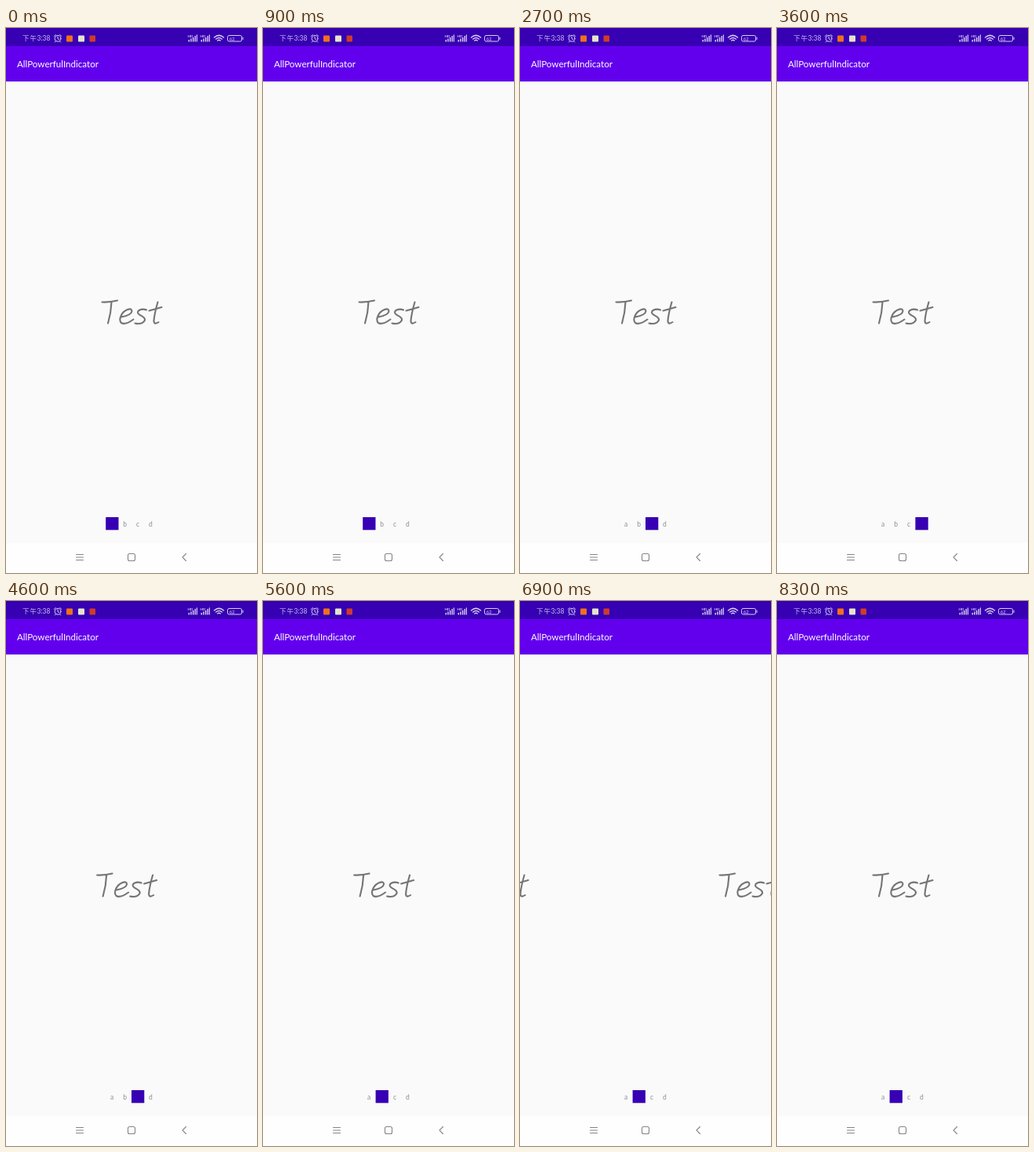
Animation of 320x693 px, one loop 8400 ms. Source, as an HTML page:

```html
<!DOCTYPE html>
<html lang="en">
<head>
<meta charset="utf-8">
<title>AllPowerfulIndicator</title>
<style>
  html, body { margin: 0; width: 100%; height: 100%; overflow: hidden; background: #fafafa; }
  svg { display: block; }
  text { font-family: Lato, "Noto Sans CJK SC", "Noto Sans CJK", sans-serif; }
  .line { fill: none; stroke-linecap: round; stroke-linejoin: round; }
</style>
</head>
<body>
<svg width="320" height="693" viewBox="0 0 320 693">
  <defs>
    <!-- handwritten word, no installed font has this shape -->
    <g id="word" class="line" stroke="#747474" stroke-width="2.1" role="img" aria-label="Test">
      <path d="M122.500 348.500Q132 349 142 346.500M134.500 348.500Q134 362 130 375.500"/>
      <path d="M147 367.500Q160 365 160.500 360Q160 356 155 358C147 361 143 371 147 375Q152 378 162.500 370.500"/>
      <path d="M179 358.500C173 356 166 359.500 168.500 363C171 366.500 178 367 177 371.500Q174 377.500 164.500 375.500"/>
      <path d="M182.500 359.500Q190 357.500 198.500 355M193.500 348.500Q189.500 362 188.500 372Q188.500 378 194.500 374"/>
    </g>
    <g id="signal" fill="#d7ccf0">
      <text x="-1" y="11.700" font-size="4.500" font-weight="bold">HD</text>
      <path d="M0 15h1.500v2.500h-1.500zM2.700 13.500h1.500v4h-1.500zM5.400 12h1.500v5.500h-1.500zM8 10h1.400v7.500h-1.400zM10.300 8.500h1.200v9h-1.200z"/>
    </g>
  </defs>

  <rect width="320" height="693" fill="#fafafa"/>
  <g id="pages"></g>
  <rect y="655" width="320" height="38" fill="#fefefe"/>

  <rect width="320" height="68" fill="#6200ee"/>
  <rect width="320" height="23" fill="#3700b3"/>
  <text x="14" y="49.500" font-size="11.600" fill="#fff">AllPowerfulIndicator</text>

  <g font-size="8.500" fill="#c9bbe8">
    <text x="21" y="16.300">下</text>
    <text x="30.500" y="16.300">午</text>
    <text x="39.500" y="16.300">3:38</text>
  </g>
  <g class="line" stroke="#d7ccf0">
    <circle cx="66" cy="13.300" r="3.900"/>
    <path d="M66 11v2.700l1.800 .8M61.300 10.500l2-2M70.700 10.500l-2-2M63.300 17l-1 1M68.700 17l1 1"/>
    <path d="M265.500 12Q271.500 6.800 277.500 12M267.700 14Q271.500 11 275.300 14M269.800 16Q271.500 14.700 273.200 16" stroke-width="1.500"/>
    <rect x="282.500" y="9.500" width="18" height="7.500" rx="2"/>
    <path d="M302 12v2.500"/>
  </g>
  <rect x="77" y="9.500" width="8" height="8" rx="1" fill="#f0701c"/>
  <rect x="92" y="9.500" width="8" height="8" rx="1" fill="#e6e2cc"/>
  <rect x="106.500" y="9.500" width="7.500" height="8" rx="1" fill="#cf3b2c"/>
  <use href="#signal" x="232.500"/>
  <use href="#signal" x="248.500"/>
  <text x="284.500" y="15.600" font-size="6.200" fill="#d7ccf0">62</text>

  <g id="tabs"></g>
  <rect id="mark" y="622" width="16.300" height="16.300" fill="#3700b3"/>

  <g class="line" stroke="#858585" stroke-width="1.100">
    <path d="M89.500 669.500h9M89.500 673h9M89.500 676.500h9M229.500 668.500l-4.500 4.500l4.500 4.500"/>
    <rect x="155.500" y="668.500" width="9" height="9" rx="2"/>
  </g>
</svg>
<script>
const LOOP = 8400, STEP = 100, WIDTH = 320, TAB = 16.4;
const $ = id => document.getElementById(id);

// Each swipe: start time, page left, page reached, share done at each step.
const settle = [.14, .54, .88, .98, 1];
const swipes = [
  [1300, 0, 1, [.02, .1, .34, .67, .93, 1]],
  [2300, 1, 2, settle],
  [3300, 2, 3, [.2, .58, .95, 1]],
  [4300, 3, 2, settle],
  [5300, 2, 1, settle],
  [6100, 1, 0, [.18, .67, .94, 1]],
  [6900, 0, 1, [.5875, .86, .955, .985, .997, 1]]
];

[..."abcd"].forEach((name, i) => {
  $("pages").innerHTML += `<use href="#word" x="${i * WIDTH}"/>`;
  $("tabs").innerHTML += `<text x="${135.2 + i * TAB}" y="634" font-size="8.5"
    text-anchor="middle" fill="#8e8e8e">${name}</text>`;
});

function draw(t) {
  let page = 0, selected = 0;
  for (const [start, from, to, shares] of swipes) {
    if (t < start) break;
    const step = Math.min(Math.floor((t - start) / STEP), shares.length - 1);
    const done = shares[step];
    page = from + (to - from) * done;
    selected = done > .5 ? to : from;
  }
  $("pages").setAttribute("transform", `translate(${-page * WIDTH} 0)`);
  $("mark").setAttribute("x", 127.2 + selected * TAB);
}

const begin = performance.now();
function tick() {
  draw((performance.now() - begin) % LOOP);
  requestAnimationFrame(tick);
}
tick();
</script>
</body>
</html>
```
